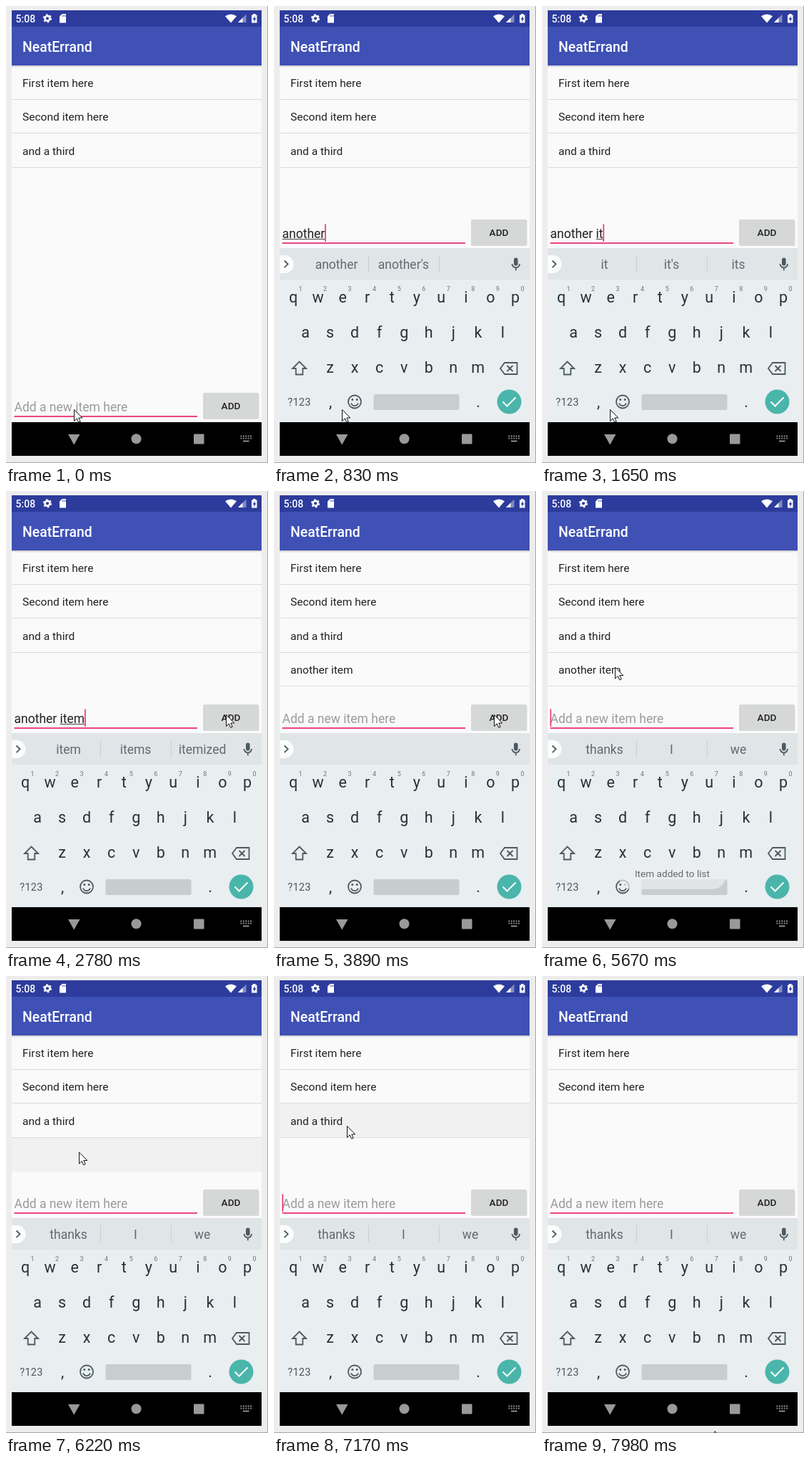
Animation, 367 px wide and 638 px high, one loop 8 s. Source, as an HTML page:

```html
<!DOCTYPE html>
<html lang="en">
<head>
<meta charset="utf-8">
<title>To-do list</title>
<style>
html, body { margin: 0; width: 100%; height: 100%; overflow: hidden; background: #ededed; }
svg { display: block; width: 367px; height: 638px; font-family: Roboto, sans-serif; }
text { white-space: pre; }
.mid { text-anchor: middle; }
.item { font-size: 15.55px; fill: #212121; }
.field { font-size: 17.5px; }
.key { font-size: 21.5px; fill: #263238; }
.digit { font-size: 9px; fill: #6b767b; }
.word { font-size: 17.5px; fill: #5f6b71; }
.icon { fill: none; stroke: #4d5a60; stroke-width: 1.8; }
</style>
</head>
<body>
<svg viewBox="0 0 367 638">
  <rect width="367" height="638" fill="#ededed"/>
  <path d="M366.5 0V638M0 637.5H367" stroke="#a5a5a5"/>
  <rect x="8" y="6" width="350" height="622" fill="#fafafa"/>

  <g id="list"></g>

  <defs>
    <linearGradient id="shade" x2="0" y2="1">
      <stop stop-color="#000" stop-opacity=".2"/><stop offset="1" stop-color="#000" stop-opacity="0"/>
    </linearGradient>
  </defs>
  <rect x="8" y="6" width="350" height="23" fill="#2d3c9c"/>
  <rect x="8" y="29" width="350" height="54" fill="#3f51b5"/>
  <rect x="8" y="83" width="350" height="3" fill="url(#shade)"/>
  <text x="23" y="64" font-size="19.4" font-weight="500" fill="#fff">NeatErrand</text>
  <g fill="#fff">
    <text x="13.5" y="22.5" font-size="14" font-weight="500">5:08</text>
    <circle cx="58" cy="17.3" r="3.4" fill="none" stroke="#fff" stroke-width="2.6"/>
    <circle cx="58" cy="17.3" r="5.2" fill="none" stroke="#fff" stroke-width="1.8" stroke-dasharray="2.7 2.745"/>
    <path d="M78.5 11H84V23.5H75V14.5Z"/>
    <path d="M79 12.5v2.5M81 12.5v2.5M83 12.5v2.5" stroke="#2d3c9c" stroke-width=".8"/>
    <path d="M307 14.3Q315 8.700 323 14.300L315 23.500Z"/>
    <path d="M336.500 11.500V23H325Z" opacity=".4"/>
    <path d="M331.500 16.500V23H325Z"/>
    <path d="M346 11h3.500v1.500h2V23.500h-7.500V12.500h2Z"/>
    <path d="M348.700 14l-3 4.800h1.700v3.200l3-4.800h-1.700Z" fill="#2d3c9c"/>
  </g>

  <g id="entry">
    <text id="value" class="field" x="11.5" y="323.5"></text>
    <rect id="compose" y="325" height="1" fill="#444"/>
    <rect x="11.500" y="330" width="256.500" height="2" fill="#ec4583"/>
    <rect id="caret" y="304.500" width="1.800" height="24.500" fill="#f0407f"/>
    <rect x="276" y="299" width="78.500" height="36" rx="2" fill="#000" opacity=".13"/>
    <rect id="button" x="276" y="298" width="78" height="35.500" rx="2"/>
    <text class="mid" x="315" y="320.700" font-size="13.600" font-weight="500" fill="#212121">ADD</text>
  </g>

  <g id="keyboard">
    <rect x="8" y="338" width="350" height="243" fill="#e9eef1"/>
    <rect x="8" y="338" width="350" height="44" fill="#e0e5e8"/>
    <path d="M8 348h7a12.500 12.500 0 0 1 0 25H8Z" fill="#fbfcfc"/>
    <path class="icon" d="M14.500 355.500l5 4.800-5 4.800"/>
    <path id="bars" d="M132.500 348v24M231.500 348v24" stroke="#c9cfd2"/>
    <g id="words"></g>
    <rect x="336" y="351.500" width="5.600" height="11" rx="2.800" fill="#4d5a60"/>
    <path class="icon" stroke-width="1.500" d="M333.500 360a5.300 5.300 0 0 0 10.600 0M338.800 365.500v3.700"/>
    <g id="keys"></g>
    <path class="icon" d="M35.500 496.500L45 506h-4.700v8.500h-9.600V506H26Z"/>
    <path class="icon" d="M323 498h17.500v16H323l-6-8ZM326.500 502l8 8M334.500 502l-8 8"/>
    <text class="mid" x="35.500" y="558" font-size="14.500" letter-spacing=".3" fill="#4a565c">?123</text>
    <circle class="icon" cx="113" cy="552.500" r="9"/>
    <path class="icon" d="M108 554.500a5.300 5.300 0 0 0 10 0"/>
    <circle cx="109.800" cy="549.500" r="1.500" fill="#4d5a60"/><circle cx="116.200" cy="549.500" r="1.500" fill="#4d5a60"/>
    <rect x="139.500" y="542" width="120" height="22" rx="2.500" fill="#c8cdd0"/>
    <circle cx="329.500" cy="552.500" r="17" fill="#4ab5aa"/>
    <path d="M320.500 552.500l6 6 12-12" fill="none" stroke="#fff" stroke-width="2"/>
  </g>

  <rect x="8" y="581" width="350" height="47"/>
  <g fill="#999">
    <path d="M87 598h16.500l-8.250 14.500Z"/>
    <circle cx="182.500" cy="604.300" r="7"/>
    <rect x="263" y="597.500" width="14.500" height="14" rx="1"/>
    <path d="M328.500 600.500h15.500M328.500 603.700h15.500" stroke="#999" stroke-width="1.800" stroke-dasharray="1.800 1.600"/>
    <path d="M332 607.500h8.500" stroke="#999" stroke-width="1.800"/>
  </g>

  <g id="toast">
    <rect x="107" y="514" width="151" height="42" rx="20" fill="#eceeee"/>
    <text class="mid" x="182.500" y="539" font-size="13.600" fill="#333">Item added to list</text>
  </g>
  <path id="pointer" d="M.5 .5V16.500L4.300 12.900 6.700 18.300 9.200 17.200 6.800 12H11.800Z" fill="#fff" stroke="#111"/>
</svg>
<script>
const LOOP = 8000, ROW = 47.6, TOP = 83;
const $ = id => document.getElementById(id);
const text = (x, y, cls, s) => `<text class="${cls}" x="${x}" y="${y}">${s}</text>`;

const keyRow = (chars, x, y) =>
  [...chars].map((c, i) => text(x + i * 34.55, y, 'mid key', c)).join('');
$('keys').innerHTML =
  keyRow('qwertyuiop', 27, 414) + keyRow('asdfghjkl', 44, 463) + keyRow('zxcvbnm', 78.5, 512) +
  [...'1234567890'].map((d, i) => text(37 + i * 34.55, 398, 'mid digit', d)).join('') +
  text(79, 560, 'mid key', ',') + text(286, 560, 'mid key', '.');

const three = ['First item here', 'Second item here', 'and a third'];
const idle = ['thanks', 'I', 'we'];
const typed = (value, ...words) => ({ value, words, caret: 1 });
const at = (x, y, more) => ({ pos: [x, y], ...more });

// Each step changes part of the state from its time on.
const steps = [
  [0, { items: three, value: '', words: idle, caret: 0, open: 0, press: 0, row: -1, glow: 0, toast: 0, pos: [95, 563] }],
  [120, { open: 1, caret: 1 }],
  [260, typed('a', 'a', 'and', 'at')],
  [400, typed('an', 'an', 'and', 'any')],
  [540, typed('anot', 'anot', 'another', 'not')],
  [690, typed('anothe', 'another', 'anothe', '')],
  [830, typed('another', 'another', "another's", '')],
  [1230, typed('another ', 'one', 'day', 'thing')],
  [1370, typed('another i', 'I', 'in', 'is')],
  [1510, typed('another it', 'it', "it's", 'its')],
  [1660, typed('another ite', 'item', 'items', 'ite')],
  [1800, typed('another item', 'item', 'items', 'itemized')],
  [2230, at(120, 543, { caret: 0 })],
  [2370, at(192, 440)],
  [2500, at(285, 302)],
  [2640, at(306, 282)],
  [2780, at(308, 312, { caret: 1 })],
  [3340, { press: 1 }],
  [3480, { items: [...three, 'another item'], value: '', words: [], caret: 1 }],
  [3620, { press: 0, caret: 0 }],
  [4030, at(322, 400, { toast: .6, words: idle })],
  [4170, at(350, 560, { toast: 1, caret: 1 })],
  [4310, at(358, 625)],
  [4440, at(330, 560)],
  [4580, at(255, 420, { caret: 0 })],
  [4720, at(165, 300)],
  [4850, at(123, 260, { caret: 1 })],
  [4970, at(107, 233)],
  [5250, at(102, 245.5)],
  [5530, { toast: .9 }],
  [5670, { toast: .7 }],
  [5800, { toast: 0, row: 3, glow: .02 }],
  [5940, { glow: .035, caret: 0 }],
  [6220, { items: three }],
  [6360, at(102, 232, { row: -1, caret: 1 })],
  [6500, at(102, 215)],
  [6650, at(102, 209, { caret: 0 })],
  [6930, { row: 2, glow: .02, caret: 1 }],
  [7090, { glow: .035 }],
  [7250, { caret: 0 }],
  [7400, { items: three.slice(0, 2) }],
  [7560, { row: -1, caret: 1 }],
  [7860, at(178, 440, { caret: 0 })],
  [7980, at(241.5, 635)]
];

function draw(s) {
  const glow = s.row < 0 ? '' :
    `<rect x="8" y="${TOP + s.row * ROW}" width="350" height="${ROW}" opacity="${s.glow}"/>`;
  $('list').innerHTML = glow + s.items.map((item, i) =>
    text(23, 112.5 + i * ROW, 'item', item) +
    `<rect x="8" y="${Math.round(TOP + (i + 1) * ROW) - 1}" width="350" height="1" fill="#dcdcdc"/>`).join('');

  $('entry').setAttribute('transform', `translate(0 ${s.open ? 0 : 242})`);
  $('keyboard').style.display = s.open ? '' : 'none';
  $('button').setAttribute('fill', s.press ? '#c6c7c7' : '#d6d7d7');

  const value = $('value');
  const width = str => { value.textContent = str; return str ? value.getComputedTextLength() : 0; };
  const start = width(s.value.slice(0, s.value.lastIndexOf(' ') + 1));
  const end = width(s.value);
  value.textContent = s.value || 'Add a new item here';
  value.setAttribute('fill', s.value ? '#212121' : '#9b9b9b');
  $('compose').setAttribute('x', 11.5 + start);
  $('compose').setAttribute('width', end - start);
  $('caret').setAttribute('x', 11.3 + end);
  $('caret').style.opacity = s.caret;

  $('words').innerHTML = s.words.map((w, i) => text([87.5, 181.5, 275][i], 367, 'mid word', w)).join('');
  $('bars').style.opacity = s.words.length ? 1 : 0;
  $('toast').style.opacity = s.toast;
  $('pointer').setAttribute('transform', `translate(${s.pos})`);
}

let shown = -1;
function tick() {
  const t = performance.now() % LOOP;
  const past = steps.filter(([ms]) => ms <= t);
  if (past.length !== shown) {
    shown = past.length;
    draw(Object.assign({}, ...past.map(([, change]) => change)));
  }
  requestAnimationFrame(tick);
}
tick();
</script>
</body>
</html>
```
